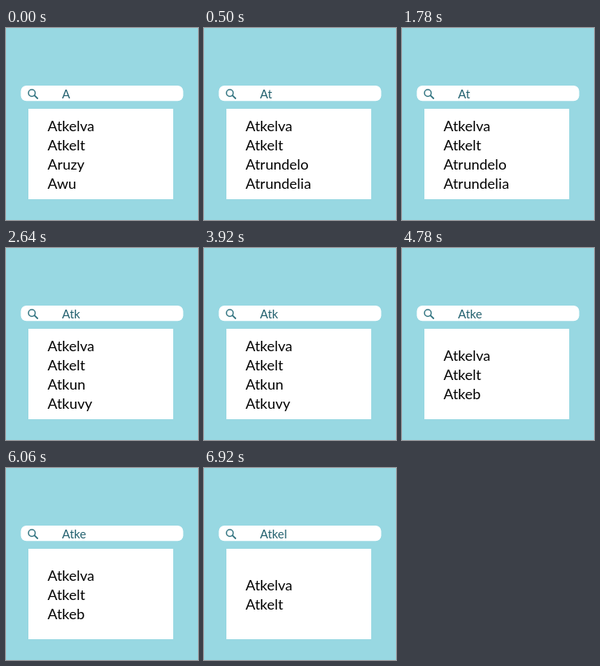
These frames come from a looping animation (240x240 px, 8 s). An HTML page with a canvas:

```html
<!DOCTYPE html>
<html lang="en">
<head>
<meta charset="utf-8">
<title>Search suggestions</title>
<style>
  html, body { margin: 0; width: 100%; height: 100%; overflow: hidden; background: #98d8e2; }
  canvas { display: block; width: 240px; height: 240px; }
</style>
</head>
<body>
<canvas id="stage"></canvas>
<script>
const SIZE = 240, LOOP = 8000, LINE = 24;
const FONT = 'Lato, Carlito, "Open Sans", sans-serif';
const TEAL = '#22606e';

const steps = [
  { at: 0,    typed: 'A',     names: ['Atkelva', 'Atkelt', 'Aruzy', 'Awu'] },
  { at: 500,  typed: 'At',    names: ['Atkelva', 'Atkelt', 'Atrundelo', 'Atrundelia'] },
  { at: 2640, typed: 'Atk',   names: ['Atkelva', 'Atkelt', 'Atkun', 'Atkuvy'] },
  { at: 4780, typed: 'Atke',  names: ['Atkelva', 'Atkelt', 'Atkeb'] },
  { at: 6920, typed: 'Atkel', names: ['Atkelva', 'Atkelt'] }
];

const canvas = document.getElementById('stage');
const ctx = canvas.getContext('2d');
const ratio = window.devicePixelRatio || 1;
canvas.width = canvas.height = Math.round(SIZE * ratio);
ctx.scale(ratio, ratio);

function text(str, x, y, size, color) {
  ctx.font = `${size}px ${FONT}`;
  ctx.fillStyle = color;
  ctx.fillText(str, x, y);
}

function searchBar(typed) {
  ctx.beginPath();
  ctx.roundRect(18.5, 72, 203, 19.3, 7);
  ctx.fillStyle = '#fff';
  ctx.fill();

  ctx.strokeStyle = '#357683';
  ctx.lineCap = 'round';
  ctx.lineWidth = 1.5;
  ctx.beginPath();
  ctx.arc(32.3, 81.2, 4.2, 0, Math.PI * 2);
  ctx.stroke();
  ctx.lineWidth = 1.8;
  ctx.beginPath();
  ctx.moveTo(35.6, 84.4);
  ctx.lineTo(39.4, 88);
  ctx.stroke();

  text(typed, 70, 88, 15, TEAL);
}

// The list stays vertically centred in its panel.
function suggestions(names) {
  ctx.fillStyle = '#fff';
  ctx.fillRect(28, 101, 181, 113);
  const top = 165 - (names.length - 1) * LINE / 2;
  names.forEach((name, i) => text(name, 52, top + i * LINE, 18, '#000'));
}

function draw(now) {
  const t = now % LOOP;
  const step = steps.findLast(s => t >= s.at) || steps[0];
  ctx.fillStyle = '#98d8e2';
  ctx.fillRect(0, 0, SIZE, SIZE);
  searchBar(step.typed);
  suggestions(step.names);
}

let start;
function tick(now) {
  start ??= now;
  draw(now - start);
  requestAnimationFrame(tick);
}
draw(0);
requestAnimationFrame(tick);
</script>
</body>
</html>
```
